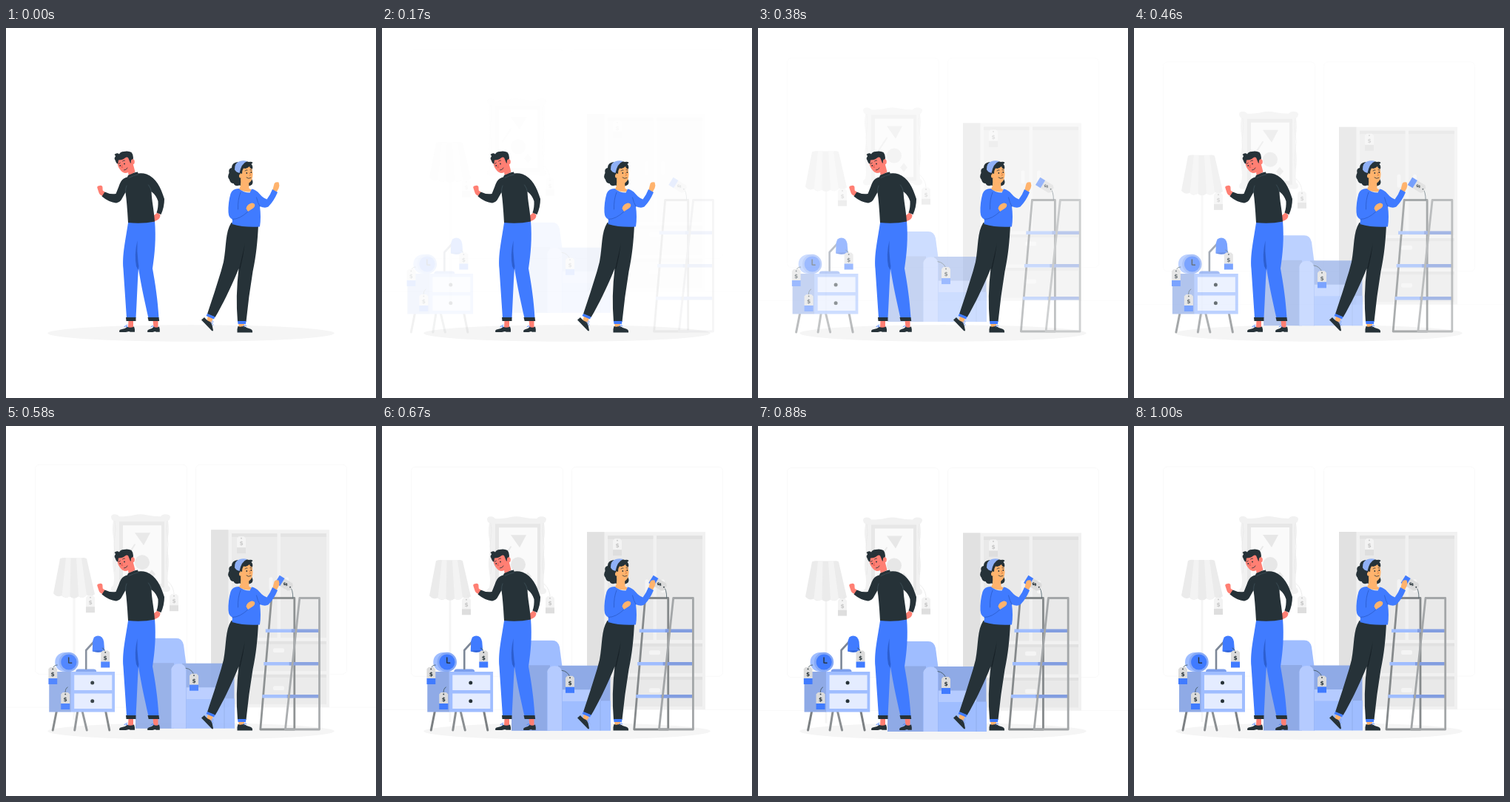
These frames come from a looping animation (500 by 500 pixels, 1.04 s). An HTML page:

```html
<!DOCTYPE html>
<html lang="en">
<head>
<meta charset="utf-8">
<title>Furniture sale</title>
<style>
  html, body { margin: 0; width: 100%; height: 100%; overflow: hidden; background: #fff; }
  svg { display: block; width: 100%; height: 100%; }

  .slide { animation: slide 1040ms infinite; }
  .down { --from: translate(0, -30px); }
  .left { --from: translate(-30px, 0); }
  .right { --from: translate(30px, 0); }
  @keyframes slide {
    0% { opacity: 0; transform: var(--from); animation-timing-function: cubic-bezier(.36, -.01, .5, 1.38); }
    93.3%, 100% { opacity: 1; transform: none; }
  }

  .tag { --paper: #dbdbdb; --band: #407bff; --ink: #263238; }
  .pale { --paper: #f3f3f3; --band: #dedede; --ink: #c4c4c4; }
  .paper { fill: var(--paper); }
  .band { fill: var(--band); }
  .ink { fill: var(--ink); }
  text { font: bold 7.5px "DejaVu Sans", sans-serif; text-anchor: middle; }

  .line { fill: none; stroke-linecap: round; stroke-linejoin: round; }
  .dark { fill: #263238; }
  .blue { fill: #407bff; }
  .mid { fill: #9fbdff; }
  .shade { fill: #8faae6; }
  .light { fill: #b5cbff; }
  .pink { fill: #ff7f73; }
  .peach { fill: #ffb36d; }
</style>
</head>
<body>
<svg viewBox="0 0 500 500">
  <defs>
    <g id="tag">
      <path class="paper" d="M-3.5 0h7l2.5 2.5v12.5h-12v-12.5z"/>
      <path class="band" d="M-6 15h12v8h-12z"/>
      <circle class="ink" cy="2.4" r=".9"/>
      <text class="ink" y="12.2">$</text>
    </g>
    <path id="shoe" class="dark" d="M0 7.500Q0 5.300 3 4.800Q8 4.300 11 1.300Q15 3.300 20 1Q21.500 4.500 21 8.300L15 8.300L13 7.600L9 8.600H1Q0 8.500 0 7.500z"/>
  </defs>

  <!-- room -->
  <g class="slide down">
    <g fill="none" stroke="#f9f9f9" stroke-width="1">
      <rect x="39.500" y="55" width="205" height="283" rx="5.500"/>
      <rect x="256.500" y="55" width="204" height="283" rx="5.500"/>
      <path d="M0 382.800H500"/>
    </g>

    <!-- floor lamp -->
    <path fill="#f5f5f5" d="M90.500 230h3v170h-3z"/>
    <path fill="#ebebeb" d="M73 182q4-2 9-1h20q4-1 7 1l11 48q-5 5-11 1q-5 6-11 2q-6 5-12 0q-6 4-11-1q-6 3-11-3z"/>
    <path fill="#f3f3f3" d="M81 181h6.500l-1 52q-6 3-11-1zM95 181h7l7 51q-5 5-11 1z"/>
    <path class="line" stroke="#e8e8e8" stroke-width=".8" d="M116 228q1 5-2 8"/>
    <use href="#tag" class="tag pale" x="114" y="232"/>

    <!-- picture -->
    <path fill="#f1f1f1" d="M142 126q0-4 5-4q4 0 6 3q12 0 20-2q9-2 17 0q9 2 19 2q2-3 6-3q7 0 7 4q0 3-3 5q2 12 0 22q-2 10 0 22q2 12 0 24q-1 10 0 19q3 2 3 5q0 4-6 4q-5 0-7-3h-56q-2 3-6 3q-5 0-5-4q0-3 3-5q2-9 0-20q-2-12 0-23q2-10 0-22q-2-10 0-22q-3-2-3-5z"/>
    <path class="line" stroke="#e9e9e9" stroke-width=".8" d="M147 131q2 11 0 21t0 23t0 24M218 131q-2 11 0 21t0 23t0 24"/>
    <path fill="#e7e7e7" d="M153 132h61v89h-61z"/>
    <path fill="#fafafa" d="M158 137h52v79h-52z"/>
    <g fill="#e7e7e7">
      <path d="M174 147h21l-9 17z"/>
      <circle cx="184" cy="187" r="10"/>
      <path d="M197 197l5 6l-5 6l-5-6z"/>
    </g>
    <path class="line" stroke="#e9e9e9" stroke-width="2" d="M174 163l-11 17"/>
    <path class="line" stroke="#e8e8e8" stroke-width=".8" d="M219 213q9 8 8 20"/>
    <use href="#tag" class="tag pale" x="227" y="230"/>

    <!-- cabinet -->
    <path fill="#f1f1f1" d="M277 143h160v240h-160z"/>
    <path fill="#e1e1e1" d="M277 143h23.500v240h-23.500z"/>
    <path fill="#e9e9e9" d="M305 148h61.500v141h-61.500zM371 148h62v141h-62zM305 293.500h128v40.500h-128zM305 338.500h128v40.500h-128z"/>
    <path fill="#e1e1e1" d="M305 148h61.500v4.500h-61.500zM371 148h62v4.500h-62zM305 293.500h128v4h-128zM305 338.500h128v4h-128z"/>
    <g fill="#f4f4f4">
      <rect x="355.500" y="207" width="5" height="18" rx="2.500"/>
      <rect x="377" y="207" width="5" height="18" rx="2.500"/>
      <rect x="361" y="303" width="15" height="6" rx="2"/>
      <rect x="361" y="354" width="15" height="6" rx="2"/>
    </g>
    <use href="#tag" class="tag pale" x="318" y="152"/>
  </g>

  <ellipse cx="250" cy="412.500" rx="193.700" ry="11.300" fill="#f5f5f5"/>

  <!-- armchair -->
  <g class="slide down">
    <path class="mid" d="M176 411v-110q1-11 11-11.500h43q8 0 10 9l4 30v83z"/>
    <path class="shade" d="M175 323h52v88.500h-52z"/>
    <path class="shade" d="M238 323.500h56v36h-56zM294 323.500h8q6 1 6.500 8v46h-14.500z"/>
    <path class="mid" d="M243 371h52v40.500h-52z"/>
    <path class="light" d="M243 356h52v15.500h-52z"/>
    <path class="mid" d="M295 371h14v40.500h-14z"/>
    <path class="line" stroke="#8faae6" stroke-width=".7" d="M295 371v40"/>
    <path class="light" d="M223 411.500v-78q1-9.500 10.500-9.500t10 9.500v78z"/>
    <path class="line" stroke="#94b2f5" stroke-width=".7" d="M223.300 411v-78M243.500 333v78"/>
    <path class="line" stroke="#455a64" stroke-width=".9" d="M243 330q8 1 11 9"/>
    <use href="#tag" class="tag" x="254" y="337.500"/>
  </g>

  <!-- nightstand -->
  <g class="slide left">
    <path class="line" stroke="#8b8f92" stroke-width="3" stroke-linecap="butt" d="M99.500 386l-4 25M106 386l6 25"/>
    <path class="line" stroke="#7c8083" stroke-width="3" stroke-linecap="butt" d="M71 386l-5 25M137.500 386l5 25"/>
    <path class="mid" d="M90 332h60v54.500h-60z"/>
    <path class="shade" d="M61 332h29.500v54.500h-29.500z"/>
    <path fill="#e4ecff" d="M95 336.500h51v20.500h-51zM95 361.500h51v20.500h-51z"/>
    <circle class="dark" cx="119.500" cy="347" r="2.500"/>
    <circle class="dark" cx="119.500" cy="371.800" r="2.500"/>

    <path fill="#7c9fee" d="M97 332q0-3.500 4-3.500h20q4 0 4 3.500z"/>
    <path class="line" stroke="#7d8797" stroke-width="2.600" d="M111 328v-25l11-12"/>
    <path class="blue" d="M119.500 304.500l.5-14q1-7 7-7q6.500 0 8 8l1 12.500q-8 3-16.500.5z"/>
    <path fill="#2f62d6" d="M119.500 304.500q8-2 16.500-.5q-8 3-16.500.5z"/>

    <path class="mid" d="M82 306h6v26h-6a13 13 0 0 1 0-26z"/>
    <circle cx="87.500" cy="319" r="13.200" fill="#86a9f6"/>
    <circle class="blue" cx="87.700" cy="319" r="10.600"/>
    <path class="line" stroke="#263238" stroke-width="1.400" d="M87.500 313v7l4 .300"/>

    <path class="line" stroke="#455a64" stroke-width=".9" d="M66 328q1-5 6-5M83 362q-1-7 3-9M137 305q-1-4-4-5"/>
    <use href="#tag" class="tag" x="66" y="326"/>
    <use href="#tag" class="tag" x="83" y="360"/>
    <use href="#tag" class="tag" x="137" y="303.500"/>
  </g>

  <!-- ladder shelf -->
  <g class="slide right">
    <path class="line" stroke="#85898b" stroke-width="2.800" d="M356 232.500h31v177.500h-46z"/>
    <path class="mid" d="M348 274.500h39v4.500h-39zM345.500 319h41v4.500h-41zM343.500 363h43v4.500h-43z"/>
    <path fill="#829de0" d="M383 274.500h38v4.500h-38zM380 319h41v4.500h-41zM377 363h44v4.500h-44z"/>
    <path class="line" stroke="#a3a6a8" stroke-width="2.800" d="M394 232.500h26.700v177.500h-46z"/>
    <path class="line" stroke="#455a64" stroke-width=".8" d="M381 217q4 4 4 15"/>
    <use href="#tag" class="tag" transform="translate(383.300 219) rotate(122)"/>
  </g>

  <!-- man -->
  <g>
    <path class="pink" d="M165.500 395h6.500v10h-7zM198.500 395h7v10h-6z"/>
    <use href="#shoe" x="153" y="402.500"/>
    <use href="#shoe" x="191" y="402.500" transform="translate(191 0) scale(.8 1) translate(-191 0)"/>
    <path class="line" stroke="#407bff" stroke-width=".8" d="M164 404q-4-3-4 0M163 404q-1-4 1-2.500M196 404q2-3 4 0"/>

    <path class="blue" d="M165.500 260C161 290 157 306 158.500 325L163 392H175.500C177 368 177.500 345 179 325C183 350 188 372 192.500 392H206.500C205 367 202 347 198 325C201 305 203 285 201 260z"/>
    <path fill="#2d5fd0" d="M177.500 287q-4.500 20-1.500 35l2.700 5q1.300-6 0-10q-2-15-1.200-30z"/>
    <path class="dark" d="M162 391h13.500v5h-13zM191.500 391h15l.7 5h-14.500z"/>

    <path class="pink" d="M134 222l-3.500 5q-4-1.500-5-4.500l-2.300-7q0-2.200 2.500-2.300q3.800-1.200 4.700 1.300l.3 5z"/>
    <path class="pink" d="M204.500 249.500l4 3q0 5-4 7l-6 2.800q-3 0-2.300-4q1-4 5-6z"/>
    <path class="dark" d="M164 201.500C157 203 154.500 208 152.500 214L148.500 224Q140 225 133.500 221.500L129.500 227.500Q139 235.500 149 236.500Q155 235 157 230L161.500 222Q163.500 236 165 263Q184 265 201 261.500C200 246 197 234 196.500 221Q203 226 205.500 234Q206 243 203.500 249.500L209.500 252Q214 242 214 231C209 215 203 203 190 197.500Q184 195.500 178.500 196.500L178 194.500Q170 195.500 165 199z"/>
    <path class="line" stroke="#455a64" stroke-width=".6" d="M161.500 222q0-6 1.500-9M196.500 221q-1-5-4-9M166 202.500q7-3.500 12.500-4.500"/>

    <path class="pink" d="M162 190L171 181L174.500 194.500Q171 197 165.500 198.500L165 194z"/>
    <path class="pink" d="M150.500 179Q150 186 153.500 190.500Q157 195.500 161 196Q166 196 168.500 192Q171 188 170 181L166 172Q158 171 150.500 179z"/>
    <path class="dark" d="M148.500 181Q150 184.500 151.500 183L152 178.500Q158 178.500 161 175.500Q165 173 166 177.500L168 182.500Q170 183 171.500 179Q173 172 169.500 168Q165 165.500 159 167Q154.500 167 153 170.500Q150 168 146.500 171Q148 172 148 173.500Q145.500 176 147.500 178.500z"/>
    <ellipse class="pink" cx="171.300" cy="180.800" rx="2.500" ry="3.500"/>
    <circle class="dark" cx="154.300" cy="186" r=".9"/>
    <circle class="dark" cx="160" cy="183.500" r=".9"/>
    <path class="line" stroke="#263238" stroke-width=".8" d="M152.300 183.500l2-1.300M157.500 180q1.500-1.500 3-1"/>
    <path class="line" stroke="#d9544a" stroke-width=".8" d="M157 185l-.7 3.500l1.500-.3"/>
    <path class="line" stroke="#263238" stroke-width=".8" d="M159.500 192q3.500 0 4.500-3"/>
  </g>

  <!-- woman -->
  <g>
    <path class="peach" d="M273 389l7 3l-2.500 7l-6-4zM314 399h8v6h-7z"/>
    <path class="dark" d="M264 394.500l4-3.500q4 5 9 6.500q2 4 3 11q-.5 1.500-2 .5z"/>
    <path class="dark" d="M312.500 411.500q-.500-5 1-8.500q4 1.500 8-.5q4 3.500 9 4.300q3 1 2.500 4.700z"/>
    <path class="line" stroke="#86a9f6" stroke-width=".9" d="M276 398q4-4 4-1q0 2-2.500 2M278 399q3 1 2 3M320 403q5-3 5 0M322 404q3-4 1-3"/>

    <path class="dark" d="M304.500 263C296 276 298 295 294 316L290.500 329Q282 357 272 386.500L282.500 391C292 375 304 351 314.500 325Q310 362 313 397H324.500Q328 362 333.500 329C338 308 340 288 341 266z"/>
    <path fill="#172026" d="M323 291q-5 22-8.500 38l2-4q4-16 6.500-34z"/>
    <path class="blue" d="M272 386l10.500 4.200l-1.500 3.300l-10.500-4.500zM313 396h11.500l-.5 4h-10.500z"/>

    <!-- hair behind, neck -->
    <path class="dark" d="M313 181Q305 182 305 189Q300 190 301.500 196Q298.500 201 302 205Q303 210 307.500 210Q310 215 315.500 212.500L319 214Q328 215 332.500 211.500Q334.500 208 332.500 205L326 188z"/>
    <path class="peach" d="M317 203L328 207L328.500 217Q332 218 332 220Q328 224 314.500 218Q318 215 317 203z"/>

    <path class="peach" d="M360 220l2.500-9.500q1-3 6-2q1.500 4 0 8l-3 5.500z"/>
    <path class="blue" d="M314.500 217Q306 217 303.500 224Q300 236 300.500 249Q301 257 306 258.500L305.500 265Q323 270 343 268.500Q345 256 343 241Q350 244 354.500 241.500Q362 234 367 222L360 218Q357 226 352.500 231.500Q347 229.500 342.500 224Q338 218.500 332 217.500L329.500 222.500Q321 222.500 314.500 217z"/>
    <path class="line" stroke="#2d5fd0" stroke-width=".9" d="M317 222q-4 10-3.500 23M306 258.500q10 0 21-10.500M338.500 229q1.500 7 4.500 12"/>
    <path class="peach" d="M324.500 244q1-5 5-6.500q4-2.300 6.500.5q1 3-2 5.500l-7 4.500z"/>

    <!-- face -->
    <path class="peach" d="M317 190Q315.500 199 318 204Q322 210 328.500 209.500Q333.500 206 333.500 197L332 186L321 186z"/>
    <path class="dark" d="M316 196Q318 200 317 203L313.500 202L312 191L320 182Q324 179 328 181Q332 180 333.500 182L331.500 184Q334 186 333 190.500Q330 190.500 329 187Q325 191 321 189.500Q318.500 193 319 197z"/>
    <path fill="#8fb0f6" d="M309 191.500Q308.500 182 316 180Q321 178.500 326 180Q318 183 315.500 196Q311 195 309 191.500z"/>
    <ellipse class="peach" cx="317" cy="200" rx="2" ry="2.800"/>
    <circle class="dark" cx="325.300" cy="196" r=".9"/>
    <circle class="dark" cx="331.300" cy="195" r=".9"/>
    <path class="line" stroke="#263238" stroke-width=".8" d="M323 193q1.500-1.500 3-1M330 191.700l2 .300"/>
    <path class="line" stroke="#d9783a" stroke-width=".8" d="M329 195.500l1.500 3.500l-1.500.5"/>
    <path class="line" stroke="#263238" stroke-width=".8" d="M325 202q2.500 2.500 6 .5"/>
  </g>
</svg>
</body>
</html>
```
